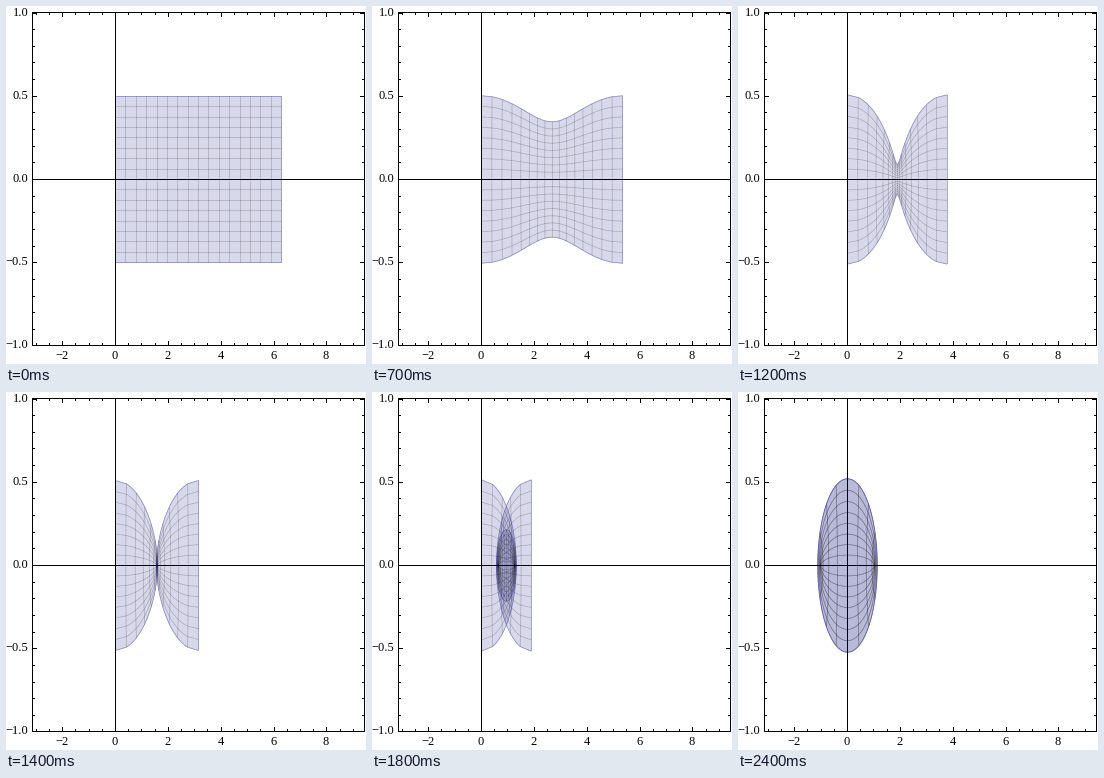
A matplotlib script that plays this animation: 360x358 px, repeating every 2900 ms.

```python
"""The strip [0, 2pi] x [-1/2, 1/2] morphing from z to sin z."""
import numpy as np
import matplotlib.pyplot as plt
from matplotlib.animation import FuncAnimation
from matplotlib.collections import LineCollection

W, H, DPI = 360, 358, 64
PX = 72 / DPI  # points per pixel
LEFT, RIGHT, TOP, BOTTOM = 26.5, 358.5, 6.5, 339.5
X0, Y0 = 109.5, 173.5
SX, SY = (RIGHT - LEFT) / (4 * np.pi), 166.5
BLUE = (0.24, 0.24, 0.6)
FILL = 0.2
CELLS = 16
SS = 4  # supersampling of the fill
END = 2 * np.pi
STEP = END / CELLS


def to_px(z):
    return np.column_stack([X0 + SX * z.real, Y0 - SY * z.imag])


def morph(z, t):
    return to_px((1 - t) * z + t * np.sin(z))


def pixel_centre(p):
    return np.floor(p + 1e-6) + 0.5


def crisp(path):
    """Put upright and level lines on pixel centres."""
    flat = np.ptp(path, axis=0) < 1e-6
    return np.where(flat, pixel_centre(path), path)


def samples(t):
    """Horizontal sample points; the end cells stay straight until late."""
    if t < 0.8:
        return np.r_[0, np.linspace(STEP, END - STEP, 14 * 8 + 1), END]
    return np.linspace(0, END, 16 * 8 + 1)


def winding(loop):
    """Winding number of a closed loop at every subpixel, by scanlines."""
    a, b = loop * SS, np.roll(loop, -1, axis=0) * SS
    ay, by = a[:, 1], b[:, 1]
    y = np.arange(H * SS)[:, None] + 0.5
    sign = (ay <= y).astype(int) - (by <= y)
    row, edge = np.nonzero(sign)
    frac = (row + 0.5 - ay[edge]) / (by[edge] - ay[edge])
    x = a[edge, 0] + frac * (b[edge, 0] - a[edge, 0])
    col = np.clip(np.ceil(x - 0.5).astype(int), 0, W * SS - 1)
    count = np.zeros((H * SS, W * SS), int)
    np.add.at(count, (row, col), sign[row, edge])
    return np.abs(np.cumsum(count, axis=1))


def coverage(loop):
    # the map is holomorphic, so the winding number counts the layers
    opacity = 1 - (1 - FILL) ** winding(loop)
    return opacity.reshape(H, SS, W, SS).mean(axis=(1, 3))


fig = plt.figure(figsize=(W / DPI, H / DPI), dpi=DPI, facecolor="white")
ax = fig.add_axes([0, 0, 1, 1])
ax.axis("off")

rgba = np.zeros((H, W, 4))
rgba[..., :3] = BLUE
fill = ax.imshow(rgba, extent=(0, W, H, 0), interpolation="nearest",
                 aspect="auto", zorder=1)


def add_lines(color, width, zorder):
    lines = LineCollection([], colors=[color], linewidths=width * PX,
                           zorder=zorder)
    lines.set_snap(False)
    return ax.add_collection(lines)


mesh = add_lines((0, 0, 0, 0.22), 0.7, 2)
edge = add_lines(BLUE + (0.55,), 0.8, 3)
ax.set_xlim(0, W)
ax.set_ylim(H, 0)


def line(xs, ys):
    ax.plot(xs, ys, color="black", lw=PX, solid_capstyle="butt",
            solid_joinstyle="miter", snap=False, zorder=4)


def label(x, y, text, ha):
    ax.text(x, y, text.replace("-", "\u2212"), ha=ha, va="baseline",
            family="Liberation Serif", size=12.5 * PX, zorder=5)


def draw_frame():
    line([LEFT, RIGHT, RIGHT, LEFT, LEFT, RIGHT],
         [TOP, TOP, BOTTOM, BOTTOM, TOP, TOP])
    line([LEFT, RIGHT], [Y0, Y0])
    line([X0, X0], [TOP, BOTTOM])
    for i in range(-6, 19):
        x = pixel_centre(X0 + SX * i / 2)
        size = 4.5 if i % 4 == 0 else 2.5
        line([x, x], [TOP, TOP + size])
        line([x, x], [BOTTOM, BOTTOM - size])
        if i % 4 == 0:
            label(x - 1, 353, str(i // 2), "center")
    for i in range(-10, 11):
        y = np.clip(pixel_centre(Y0 - SY * i / 10), TOP, BOTTOM)
        size = 4.5 if i % 5 == 0 else 2.5
        line([LEFT, LEFT + size], [y, y])
        line([RIGHT, RIGHT - size], [y, y])
        if i % 5 == 0:
            label(22.5, y + 2.5, f"{i / 10:.1f}", "right")


def update(frame):
    t = min(max(frame - 4, 0), 20) / 20
    u = samples(t)
    v = np.linspace(-0.5, 0.5, 33)
    rows = [morph(u + 1j * c, t) for c in np.linspace(-0.5, 0.5, CELLS + 1)]
    cols = [morph(c + 1j * v, t) for c in np.linspace(0, END, CELLS + 1)]
    mesh.set_segments([crisp(p) for p in rows[1:-1] + cols[1:-1]])
    edge.set_segments([crisp(p) for p in rows[::CELLS] + cols[::CELLS]])
    loop = np.vstack([rows[0], cols[-1], rows[-1][::-1], cols[0][::-1]])
    rgba[..., 3] = coverage(loop)
    fill.set_data(rgba)
    return fill, mesh, edge


draw_frame()
anim = FuncAnimation(fig, update, frames=29, interval=100, repeat=True,
                     repeat_delay=0, blit=False)
plt.show()
```
